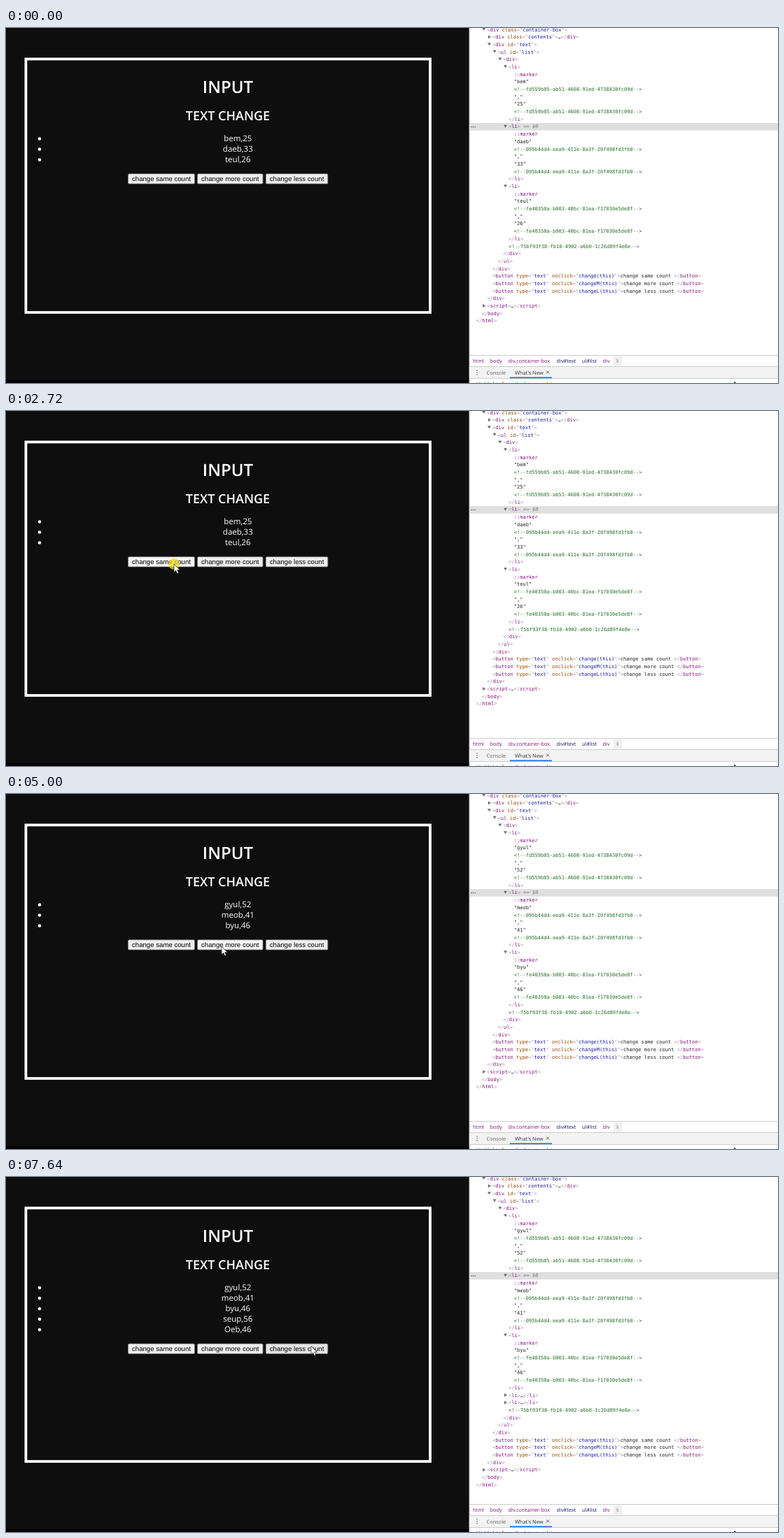
These frames come from a looping animation (1103x508 px, 8000 ms). An HTML page:

```html
<!DOCTYPE html>
<html lang="en">
<head>
<meta charset="utf-8">
<title>List update demo</title>
<style>
  html, body { margin: 0; width: 100%; height: 100%; overflow: hidden; background: #0e0e0e; }
  svg { display: block; width: 1103px; height: 508px; }
  text { white-space: pre; text-rendering: geometricPrecision; }
  .page { font-family: "Open Sans", "Noto Sans", sans-serif; fill: #fff; text-anchor: middle; }
  .title { font-weight: 600; }
  .item { font-size: 11.5px; }
  .button rect { stroke: #767676; stroke-width: .8; }
  .button text { font: 9.65px "Liberation Sans", Arial, sans-serif; fill: #000; text-anchor: middle; }
  .code { font: 7.07px "DejaVu Sans Mono", monospace; fill: #222; }
  .mark { fill: #a894a6; }
  .tag { fill: #881280; }
  .attr { fill: #994500; }
  .value { fill: #1a1aa8; }
  .comment { fill: #236e25; }
  .selected { fill: #777; font-style: italic; }
  .arrow { fill: #6e6e6e; }
  .flash { fill: #9e3699; }
  .bar { font: 7.4px "Open Sans", "Noto Sans", sans-serif; fill: #5f6368; }
</style>
</head>
<body>
<svg viewBox="0 0 1103 508">
  <rect width="1103" height="508" fill="#0e0e0e"/>
  <rect y="504" width="662" height="4" fill="#050003"/>
  <rect x="28.4" y="44.4" width="577.6" height="362.6" fill="none" stroke="#fff" stroke-width="3.8"/>
  <text class="page title" x="317" y="93" font-size="24">INPUT</text>
  <text class="page title" x="317" y="131.5" font-size="18">TEXT CHANGE</text>
  <g id="items"></g>
  <g id="buttons"></g>

  <rect x="662" width="441" height="508" fill="#fff"/>
  <rect x="661.5" width="1" height="508" fill="#b8b8b8"/>
  <rect x="663" y="136" width="440" height="10.7" fill="#dfdfdf"/>
  <g fill="#555"><circle cx="665" cy="141.5" r=".8"/><circle cx="667.6" cy="141.5" r=".8"/><circle cx="670.2" cy="141.5" r=".8"/></g>
  <g id="tree"></g>

  <g id="footer" class="bar">
    <rect x="662" y="468" width="441" height="1" fill="#ccc"/>
    <rect x="868" y="469.5" width="12" height="14" fill="#f0f0f0"/>
    <rect x="662" y="484" width="441" height="17.5" fill="#f3f3f3"/>
    <rect x="662" y="484" width="441" height="1" fill="#ccc"/>
    <rect x="662" y="501" width="441" height="1" fill="#ccc"/>
    <rect x="720" y="499.5" width="60" height="1.7" fill="#1a73e8"/>
    <circle cx="673" cy="490" r=".8"/><circle cx="673" cy="493" r=".8"/><circle cx="673" cy="496" r=".8"/>
    <text x="686.5" y="495.6">Console</text>
    <text x="727" y="495.6" fill="#333">What's New</text>
    <path d="M772 490.5l4 4m0-4l-4 4" stroke="#444" stroke-width=".9"/>
    <text x="672" y="511.5" fill="#444">Highlights from the latest update</text>
    <rect x="1040" y="506.5" width="2.5" height="1.5" fill="#333"/>
  </g>

  <circle id="click" r="8" fill="#f0dc14" fill-opacity=".7"/>
  <path id="cursor" d="M0 0V11.6L2.7 9.2L4.6 13.6L6.6 12.7L4.7 8.5H8.3Z" fill="#fff" stroke="#222" stroke-width=".7"/>
</svg>
<script>
const LOOP = 8000, FADE = 1400, ROW = 10.69, CHAR = 4.257;
const CHANGE = 2870, ADD = 5080;
const $ = id => document.getElementById(id);

const before = [['bem', 25], ['daeb', 33], ['teul', 26]];
const after = [['gyul', 52], ['meob', 41], ['byu', 46]];
const lists = [before, after, [...after, ['seup', 56], ['Oeb', 46]]];
const ids = [
  'fd559b05-ab51-4608-91ed-4738430fc09d',
  '095b44d4-eea9-411e-8a3f-20f498fd3fb0',
  'fe40350a-b003-40bc-81ea-f17030e5de8f',
  'T5bf93f38-fb10-4902-a6b0-1c26d89f4e8e'
];

// Cursor moves: start, end, steps, from, to
const moves = [
  [70, 850, 11, [1103, 508], [249, 221]],
  [940, 1020, 2, [249, 221], [240, 219]],
  [3760, 4300, 8, [240, 219], [308, 218]],
  [6670, 7410, 10, [308, 218], [439, 241]],
  [7490, 7640, 3, [439, 241], [436, 242]]
];
// Hovered button from each time on
const hovers = [[0, -1], [850, 0], [3910, -1], [3990, 1], [6670, -1], [7240, 2]];
const presses = [[2720, 2870, 0], [4920, 5080, 1]];
const clicks = [[2720, 2870], [4920, 5000]];

const esc = s => String(s).replace(/</g, '&lt;').replace(/>/g, '&gt;');
const span = (cls, s) => `<tspan class="${cls}">${esc(s)}</tspan>`;
const attr = ([name, value]) => ' ' + span('attr', name) + span('mark', '="') + span('value', value) + span('mark', '"');
const open = (name, attrs = {}, cls = 'tag') =>
  span('mark', '<') + span(cls, name) + Object.entries(attrs).map(attr).join('') + span('mark', '>');
const close = name => span('mark', '</') + span('tag', name) + span('mark', '>');
const folded = (name, attrs, cls) => open(name, attrs, cls) + '…' + close(name);
const comment = id => span('comment', `<!--${id}-->`);
const button = (fn, label) => open('button', { type: 'text', onclick: fn + '(this)' }) + label + ' ' + close('button');

function drawTree(state) {
  let out = '', n = 0;
  // Arrow is 'v' for open, '>' for folded; flash is [first column, length]
  const row = (depth, html, arrow, flash) => {
    const x = 671.8 + 7.7 * depth, y = 2 + ROW * n++;
    if (arrow === 'v') out += `<path class="arrow" d="M${x - 7} ${y - 2.2}h5l-2.5 4z"/>`;
    if (arrow === '>') out += `<path class="arrow" d="M${x - 6} ${y - 2.5}l4 2.5l-4 2.5z"/>`;
    if (flash) out += `<rect class="flash" x="${x + CHAR * flash[0]}" y="${y - 5}" width="${CHAR * flash[1]}" height="10"/>`;
    out += `<text class="code" x="${x}" y="${y + 2.5}">${html}</text>`;
  };
  const literal = value => {
    const flash = state === 1 && [1, String(value).length];
    row(7, `"${span(flash ? 'hot' : '', value)}"`, '', flash);
  };

  row(2, open('div', { class: 'container-box' }), 'v');
  row(3, folded('div', { class: 'contents' }), '>');
  row(3, open('div', { id: 'text' }), 'v');
  row(4, open('ul', { id: 'list' }), 'v');
  row(5, open('div'), 'v');
  lists[state].forEach(([name, age], i) => {
    if (i > 2) return row(6, folded('li'), '>', [1, 2]);
    row(6, open('li') + (i === 1 ? span('selected', ' == $0') : ''), 'v');
    row(7, span('tag', '::marker'));
    literal(name);
    row(7, comment(ids[i]));
    row(7, '","');
    literal(age);
    row(7, comment(ids[i]));
    row(6, close('li'));
  });
  row(6, comment(ids[3]));
  row(5, close('div'));
  row(4, close('ul'));
  row(3, close('div'));
  row(3, button('change', 'change same count'));
  row(3, button('changeM', 'change more count'));
  row(3, button('changeL', 'change less count'));
  row(2, close('div'));
  row(2, folded('script'), '>');
  row(1, close('body'));
  row(0, close('html'));
  $('tree').innerHTML = out;
}

function drawItems(state) {
  $('items').innerHTML = lists[state].map(([name, age], i) =>
    `<circle cx="48" cy="${158.5 + 15 * i}" r="2.3" fill="#fff"/>
     <text class="page item" x="331.3" y="${162.3 + 15 * i}">${name},${age}</text>`).join('');
  $('buttons').setAttribute('transform', `translate(0 ${state === 2 ? 30 : 0})`);
}

$('buttons').innerHTML = [['same', 174.5, 95], ['more', 273.5, 93.5], ['less', 371.3, 88.5]].map(([word, x, w]) =>
  `<g class="button"><rect x="${x}" y="208.7" width="${w}" height="14.2" rx="1.5"/>
   <text x="${x + w / 2}" y="219.3">change ${word} count</text></g>`).join('');

$('footer').insertAdjacentHTML('beforeend',
  [['html', 667], ['body', 691.5], ['div.container-box', 717.5], ['div#text', 786.5], ['ul#list', 823], ['div', 852.5], ['li', 872]]
    .map(([s, x], i) => `<text x="${x}" y="479.3" fill="${i === 6 ? '#888' : i === 3 || i === 4 ? '#1a1a6a' : '#881280'}">${s}</text>`).join(''));

function cursorAt(t) {
  let pos = null;
  for (const [start, end, steps, from, to] of moves) {
    if (t < start) break;
    const k = Math.min(steps, 1 + Math.floor((t - start) / (end - start) * (steps - 1) + 1e-6));
    const u = (1 - Math.cos(Math.PI * k / steps)) / 2;
    pos = from.map((v, i) => v + (to[i] - v) * u);
  }
  return pos;
}

const active = (spans, t) => spans.find(([a, b]) => t >= a && t < b);
const buttonRects = document.querySelectorAll('.button rect');
let shown = -1;

function render(t) {
  const state = t < CHANGE ? 0 : t < ADD ? 1 : 2;
  if (state !== shown) {
    shown = state;
    drawTree(state);
    drawItems(state);
  }

  const age = Math.min(1, (t - (state === 2 ? ADD : CHANGE)) / FADE);
  const glow = state ? (1 - age) ** 2.2 : 0;
  const ink = Math.round(34 + 221 * glow);
  document.querySelectorAll('.flash').forEach(el => el.style.opacity = glow);
  document.querySelectorAll('.hot').forEach(el => el.style.fill = `rgb(${ink},${ink},${ink})`);

  const hover = hovers.filter(h => t >= h[0]).pop()[1];
  const press = active(presses, t);
  buttonRects.forEach((el, i) => {
    el.style.fill = press && press[2] === i ? '#f5f5f5' : hover === i ? '#e5e5e5' : '#efefef';
  });

  const pos = cursorAt(t);
  const place = pos ? `translate(${pos})` : 'translate(-50 -50)';
  $('cursor').setAttribute('transform', place);
  $('click').setAttribute('transform', place);
  $('click').style.display = active(clicks, t) ? '' : 'none';
}

const begin = performance.now();
function tick() {
  render((performance.now() - begin) % LOOP);
  requestAnimationFrame(tick);
}
tick();
</script>
</body>
</html>
```
